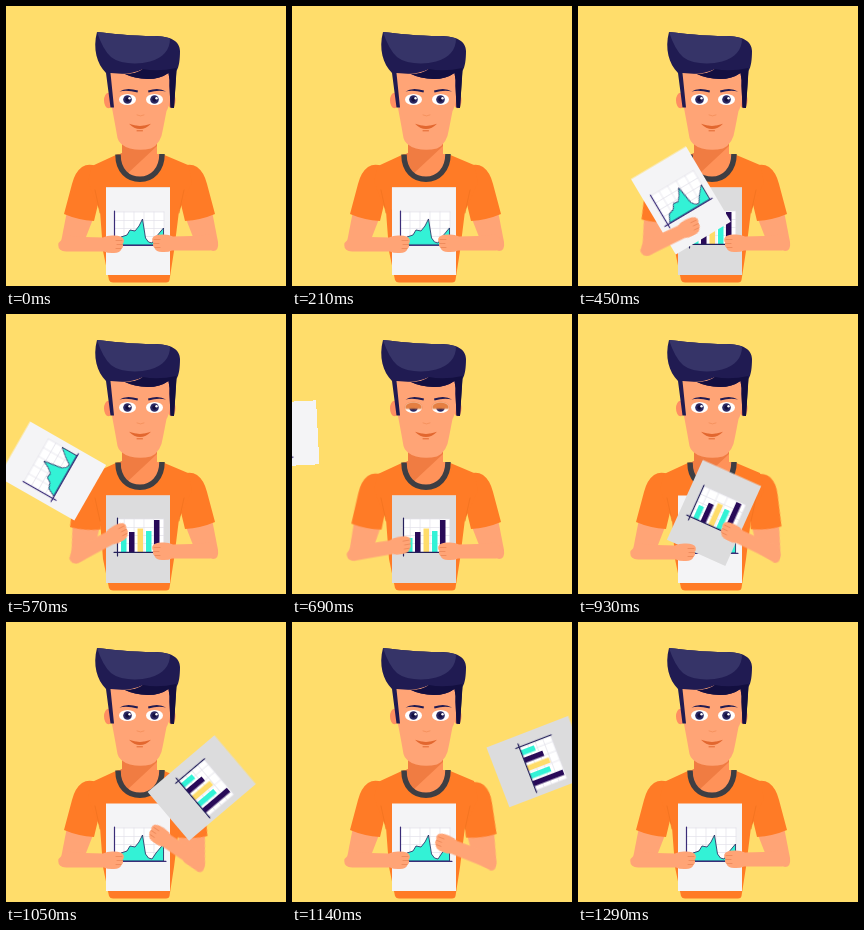
Recreate the animation shown at these times as an HTML page. Size 280 px wide and 280 px high, loop 1320 ms.

```html
<!DOCTYPE html>
<html lang="en">
<head>
<meta charset="utf-8">
<title>Report presenter</title>
<style>
  html, body { margin: 0; width: 100%; height: 100%; overflow: hidden; background: #ffdd6b; }
  svg { display: block; width: 100%; height: 100%; }

  .navy { fill: #201b52; }
  .purple { fill: #280a58; }
  .skin { fill: #ffa476; }
  .shirt { fill: #ff7b26; }
  .teal { fill: #33f2d6; }
  .line { fill: none; stroke-linecap: round; stroke-linejoin: round; }

  .upper, .fore, .paper, .lid { animation: 1320ms linear infinite; }
  .upper { transform-origin: 78px 170px; animation-name: upper; }
  .fore { transform-origin: 57px 238px; animation-name: fore; }
  /* the second arm repeats the first one 540 ms later */
  .right .upper, .right .fore { animation-delay: -780ms; }
  .paper { transform-origin: 132px 225.5px; }
  .area { animation-name: throw-left; }
  .bars { animation-name: throw-right; }
  .lid { animation-name: blink; }

  @keyframes upper {
    0%, 15.909% { transform: translateY(0) rotate(0); animation-timing-function: ease-in-out; }
    29.545% { transform: translateY(2px) rotate(-8deg); }
    34.091% { transform: translateY(3px) rotate(-8deg); }
    38.636% { transform: translateY(3px) rotate(-11deg); animation-timing-function: ease-in-out; }
    52.273% { transform: translateY(1px) rotate(-2deg); }
    56.818%, 100% { transform: translateY(0) rotate(0); }
  }
  @keyframes fore {
    0%, 15.909% { transform: rotate(0); animation-timing-function: ease-in-out; }
    29.545% { transform: rotate(-18deg); }
    34.091% { transform: rotate(-18deg); }
    38.636% { transform: rotate(-23deg); animation-timing-function: ease-in-out; }
    52.273% { transform: rotate(-8deg); }
    56.818%, 100% { transform: rotate(0); }
  }
  @keyframes throw-left {
    0%, 15.909% { transform: none; opacity: 1; }
    20.455% { transform: translate(0, -4px) rotate(-4deg); }
    25% { transform: translate(-1px, -12px) rotate(-12deg); }
    29.545% { transform: translate(-8px, -22px) rotate(-21deg); }
    34.091% { transform: translate(-28.5px, -30.5px) rotate(-30.5deg); }
    43.182% { transform: translate(-85px, -68px) rotate(-60deg); }
    52.273% { transform: translate(-149px, -104.5px) rotate(-92.7deg); }
    56.818% { transform: translate(-192px, -130px) rotate(-110deg); opacity: 1; }
    56.82%, 100% { transform: translate(-192px, -130px) rotate(-110deg); opacity: 0; }
  }
  @keyframes throw-right {
    0%, 56.818% { transform: none; }
    61.364% { transform: translate(0, -4px) rotate(4deg); }
    65.909% { transform: translate(0, -14px) rotate(13deg); }
    70.455% { transform: translate(3.5px, -26px) rotate(24deg); }
    75% { transform: translate(31px, -43px) rotate(36deg); }
    79.545% { transform: translate(63px, -59px) rotate(49.5deg); }
    93.182% { transform: translate(165px, -112px) rotate(88deg); }
    95.455%, 100% { transform: translate(200px, -126px) rotate(97deg); }
  }
  @keyframes blink {
    0%, 46.5% { transform: none; }
    50%, 52.273% { transform: translateY(8px); }
    56%, 100% { transform: none; }
  }
</style>
</head>
<body>
<svg viewBox="0 0 280 280">
  <defs>
    <clipPath id="eyeClip"><ellipse rx="8.5" ry="5.5"/></clipPath>

    <g id="eye">
      <ellipse rx="8.5" ry="5.5" fill="#fff"/>
      <circle r="4.3" fill="#2b2963"/>
      <circle r="2.2" fill="#141040"/>
      <circle cx="2" cy="-1.2" r="1.2" fill="#fff"/>
    </g>

    <g id="upperArm">
      <path class="skin" d="M62 200L55 236Q54 245 60 245L76 238L80 231L87 213L86 198Z"/>
      <path class="shirt" d="M90 160Q82 157 76 161Q69 166 66 178L58 208Q72 214 88 215L94 190L97 165Z"/>
    </g>

    <g id="foreArm">
      <path class="skin" d="M60 229.500L78 231L97 231.500Q102 229 108 229.500Q116 229.500 117.500 233
        Q118.500 236 116.500 238Q118 241 115.500 243Q114 247 108 247Q102 247.500 98 245.500
        L60 245.500Q51 245 52.500 237Z"/>
      <path class="line" stroke="#e98353" stroke-width=".7" d="M110 234.500H116M111 238.500H116.500M110 242.500H115"/>
    </g>

    <g id="grid" class="line" stroke="#e3e1ea" stroke-width=".7">
      <path d="M109 206H158M109 214.500H158M109 222.500H158M109 230.500H158"/>
      <path d="M118 206V239M128 206V239M138 206V239M148 206V239M158 206V239"/>
    </g>

    <g id="areaPage">
      <path fill="#f4f4f6" d="M100 181.500H164V269H100Z"/>
      <path fill="#fff" d="M108 206H158V239H108Z"/>
      <use href="#grid"/>
      <path class="teal" stroke="#25215b" stroke-width=".8" stroke-linejoin="round"
        d="M111 239L115 231L121 229L124 224L129 225L133 220L136.500 213L139.500 232L142.500 236L146 237L150 231L157.500 222V239Z"/>
      <path class="line" stroke="#3a2c78" stroke-width="1.200" d="M108.500 205V243M105 239.300H160"/>
    </g>
  </defs>

  <rect width="280" height="280" fill="#ffdd6b"/>

  <!-- arms behind the sheets -->
  <g><g class="upper"><use href="#upperArm"/></g></g>
  <g class="right" transform="translate(267) scale(-1 1)"><g class="upper"><use href="#upperArm"/></g></g>

  <!-- body -->
  <path class="shirt" d="M112 148L86 160L82 176L94 205L97 245L103 274Q104 276.500 107 276.500H160Q163 276.500 163.500 274L168 245L173 205L186 176L182 159L156 148Z"/>
  <path class="line" stroke="#f27320" stroke-width=".8" d="M89 184L94 207M178 184L173 207"/>
  <path fill="#ff9259" d="M116 130H151V148H156C156 164 147 173 134 173C121 173 112 165 112 149L116 147Z"/>
  <path fill="#f07c42" d="M116 130H151V140L121 168Q112 161 112 149L116 147Z"/>
  <path fill="none" stroke="#3e3e43" stroke-width="5.500" d="M112 148.500C112 165 122 173.300 134 173.300S156 164 156 148"/>

  <!-- head -->
  <ellipse cx="102.500" cy="94.500" rx="4.500" ry="7.800" fill="#ff8e62"/>
  <ellipse cx="165.500" cy="94.500" rx="4" ry="7.800" fill="#ff8e62"/>
  <path class="skin" d="M104 60H165V90Q163 101 160.500 105L157 123Q155 138 145 142.500Q134 145 124 142.500Q113 139 111.500 132L109 118L106 102Z"/>
  <path class="navy" d="M91 26C105 27.500 125 30 148 30C164 30 174 35 174 45C174 54 173 61 170.500 65L168 102L164.500 101.500L163.500 80Q164 74 162.500 67Q154 73 142 73Q128 72.500 119 68L104.500 67L108 101.500L104.500 101.500L100 67C91 58 86.500 43 91 26Z"/>
  <path fill="#363468" d="M91 26C105 27.500 125 30 148 30Q158 30 164 32.500C164 44 157 52 144 55.500C131 59 114 58 105 51Q97 44 91 26Z"/>
  <path class="skin" d="M107 68Q126 69 137 63Q131 68 119 68L107 72Z"/>
  <path fill="#130f40" d="M119 68Q131 68 137 63Q152 66 170.500 62L168 102L164.500 101.500L163.500 80Q164 74 162.500 67Q154 73 142 73Q128 72.500 119 68Z"/>
  <path class="navy" d="M113.500 85.500Q120 81 132 84.500L131.500 86.500Q121 83.500 113.500 85.500ZM142 84.500Q153 81 160 85.500Q152 83.500 142.500 86.500Z"/>
  <g transform="translate(121.500 93.500)">
    <use href="#eye"/>
    <g clip-path="url(#eyeClip)"><rect class="lid" x="-10" y="-22" width="20" height="15.500" fill="#e57f42"/></g>
  </g>
  <g transform="translate(148.500 93.500)">
    <use href="#eye"/>
    <g clip-path="url(#eyeClip)"><rect class="lid" x="-10" y="-22" width="20" height="15.500" fill="#e57f42"/></g>
  </g>
  <path class="line" stroke="#f6935f" stroke-width="1" d="M131 109Q134.500 111 138 109"/>
  <path fill="#e2672f" d="M123 117.800Q134 122 145 117.800Q140 123 134 123Q128 123 123 117.800Z"/>
  <path class="skin" d="M123 117.200Q134 122.500 145 117.200Q134 123 123 117.200Z"/>
  <path class="line" stroke="#e2672f" stroke-width="1" d="M131 124.800H136.500"/>

  <!-- sheets -->
  <use href="#areaPage"/>
  <g class="paper bars">
    <path fill="#dcdcdd" d="M100 181.500H164V269H100Z"/>
    <path fill="#fff" d="M111 205H158V238H111Z"/>
    <use href="#grid" transform="translate(2 -1) scale(.985 1)"/>
    <path class="teal" d="M115 224H120.500V238H115ZM140 217H145.500V238H140Z"/>
    <path class="purple" d="M123 218H128.500V238H123ZM148 206H153.500V238H148Z"/>
    <path fill="#ffdc6a" d="M131.500 214.500H137V238H131.500Z"/>
    <path class="line" stroke="#25215b" stroke-width="1.200" d="M111.500 204V242M108 238.300H160"/>
  </g>
  <g class="paper area"><use href="#areaPage"/></g>

  <!-- forearms and hands -->
  <g><g class="upper"><g class="fore"><use href="#foreArm"/></g></g></g>
  <g class="right" transform="translate(267) scale(-1 1)"><g class="upper"><g class="fore"><use href="#foreArm" x="3" y="-1"/></g></g></g>
</svg>
</body>
</html>
```
